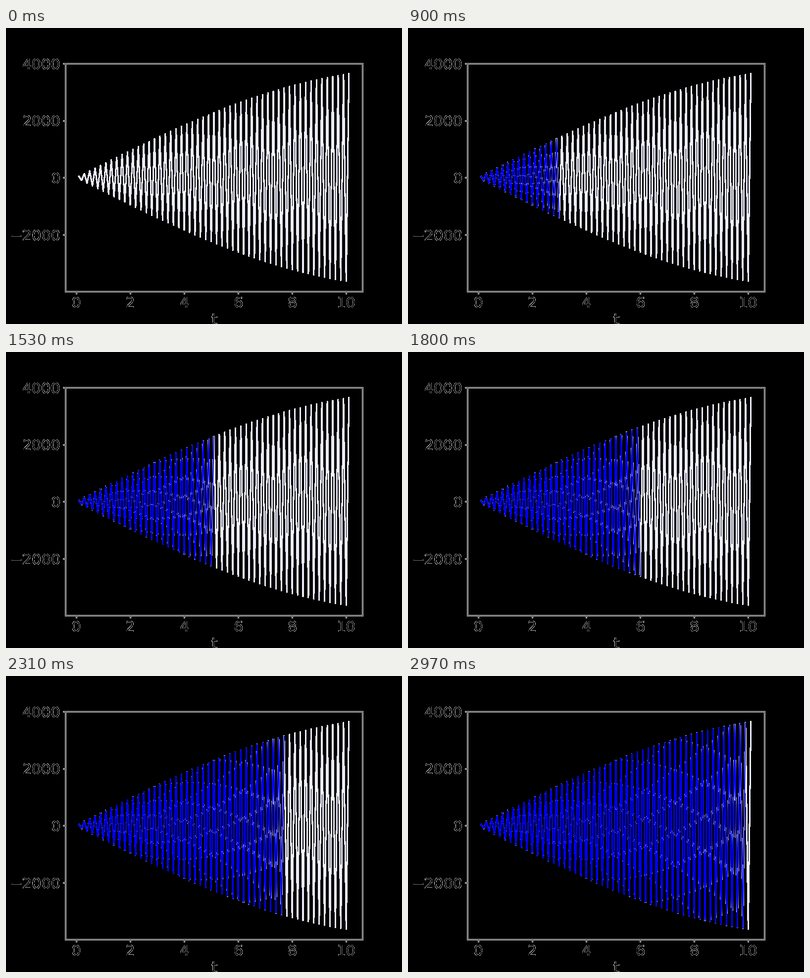
A matplotlib script that plays this animation: 800x600 px, repeating every 3 s.

```python
import numpy as np
import matplotlib.pyplot as plt
from matplotlib.animation import FuncAnimation

FRAMES, INTERVAL = 100, 30

plt.rcParams.update({"font.family": "DejaVu Sans", "font.size": 22})


def white_to_black(img, dpi):
    """Knock out pure white, keeping the antialiased fringes."""
    out = np.rint(img * 255).astype(np.uint8)
    out[(out[..., :3] == 255).all(axis=-1), :3] = 0
    return out, 0, 0


fig, ax = plt.subplots(figsize=(8, 6), dpi=100, facecolor="white")
fig.subplots_adjust(left=0.15, right=0.9, bottom=0.11, top=0.88)
fig.set_agg_filter(white_to_black)

# Fast oscillation sampled near its half period: alternating sign, slow envelope
t = np.arange(1, 102) / 10
current = -3813 * np.sin(0.04 * np.pi * t) * np.cos(10 * np.pi * t)

ax.plot(t, current, color="lavender", lw=1.5)
ax.set_xlabel("t")
ax.set_xlim(ax.get_xlim())
ax.set_ylim(ax.get_ylim())

# Each step lays a longer trace over the earlier ones, so old edges saturate
traces = [ax.plot(t[:n], current[:n], color="blue", lw=1.5)[0]
          for n in range(2, FRAMES)]


def update(step):
    for n, trace in enumerate(traces, start=2):
        trace.set_visible(n <= step)
    return traces


anim = FuncAnimation(fig, update, frames=FRAMES, interval=INTERVAL,
                     repeat=True, repeat_delay=0, blit=False)
plt.show()
```
